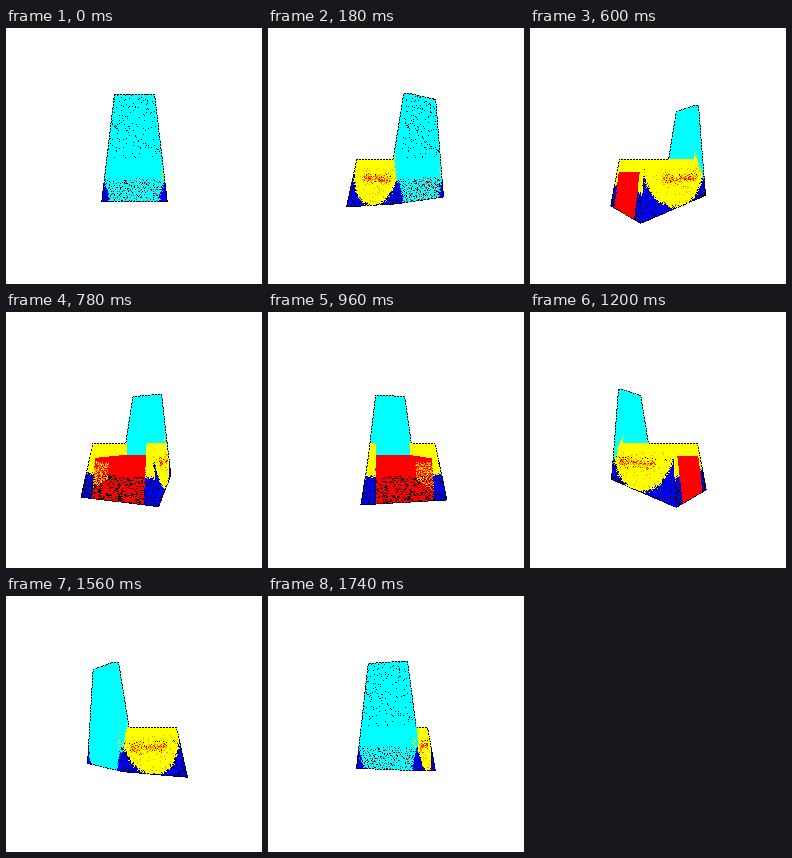
A matplotlib script for the animation above (1800 ms loop, 256 by 256 pixels).

```python
import numpy as np
import matplotlib.pyplot as plt
from matplotlib.animation import FuncAnimation

SIZE, FRAMES, INTERVAL = 256, 30, 60
CX, CY, DIST = 128.5, 131, 221.7
STEP = 0.55

CYAN, YELLOW, RED = (0, 255, 255), (255, 255, 0), (255, 0, 0)
BLUE, ORANGE, BLACK = (0, 0, 255), (255, 150, 0), (0, 0, 0)

rng = np.random.default_rng(4)


def patch(a, b, c, d):
    """Evenly spaced points on the bilinear quad a-b-c-d."""
    a, b, c, d = (np.array(p, float) for p in (a, b, c, d))
    nu = int(max(np.linalg.norm(b - a), np.linalg.norm(c - d)) / STEP) + 2
    nv = int(max(np.linalg.norm(d - a), np.linalg.norm(c - b)) / STEP) + 2
    u, v = np.meshgrid(np.linspace(0, 1, nu), np.linspace(0, 1, nv))
    u, v = u.reshape(-1, 1), v.reshape(-1, 1)
    return (1 - v) * ((1 - u) * a + u * b) + v * ((1 - u) * d + u * c)


def flip(p):
    return (-p[0], p[1], p[2])


def strip(top, bottom):
    """Quad that is symmetric about the middle plane."""
    return patch(flip(top), top, bottom, flip(bottom))


def fill(pts, base):
    return np.tile(np.array(base, np.uint8), (len(pts), 1))


def paint_rear(p):
    col = fill(p, CYAN)
    x, y, _ = (p + rng.normal(0, 0.7, p.shape)).T
    col[(y < -16) & (np.abs(x) > 25 + (16 + y) * 0.23)] = BLUE
    rim = (x > 22) & (y < -3) & (y > -18)
    col[rim & (rng.random(len(p)) < 0.3)] = YELLOW
    return col


def paint_side(p):
    col = fill(p, YELLOW)
    _, y, z = (p + rng.normal(0, 0.9, p.shape)).T
    col[((z - 2) / 35) ** 2 + ((y + 5) / 38) ** 2 > 1] = BLUE
    col[(z > 27 + (8 - y) * 0.33) & (y > -20)] = CYAN
    return col


def paint_arm_front(p):
    col = fill(p, YELLOW)
    col[p[:, 1] + rng.normal(0, 1, len(p)) < -28] = BLUE
    return col


# Corners of the right half of the armchair
rear_top, rear_low = (16.6, 54, 37.5), (27.2, -35.5, 37.3)
back_top, back_low = (16.6, 54, 33), (24.2, -14, 25)
rear_mid, back_mid = (23, 0, 37.4), (23, 0, 27)
arm_out, foot_out = (28.5, 0, -30.5), (37, -49.6, -37)
arm_in, foot_in = (25, 0, -30.5), (25, -49.6, -37)
seat_front, seat_back = (25, -14, -32.3), (21, -14, 27)
arm_back = (21, 0, 27)

rear = strip(rear_top, rear_low)
front = strip(seat_front, foot_in)
side = np.vstack([patch(arm_out, rear_mid, rear_low, foot_out),
                  patch(back_top, rear_top, rear_mid, back_mid)])
arm_front = patch(arm_in, arm_out, foot_out, foot_in)
inner = np.vstack([patch(arm_in, arm_back, seat_back, seat_front),
                   patch(arm_in, arm_out, back_mid, arm_back)])
MIRROR = np.array([-1, 1, 1])

parts = [(rear, paint_rear(rear)), (front, fill(front, RED))]
for pts in (strip(back_top, back_low), strip(back_top, rear_top)):
    parts.append((pts, fill(pts, CYAN)))
seat = strip(seat_front, seat_back)
parts.append((seat, fill(seat, RED)))
for m in (1, MIRROR):
    parts += [(side * m, paint_side(side)),
              (arm_front * m, paint_arm_front(arm_front)),
              (inner * m, fill(inner, YELLOW))]

# Loose specks: positions, colours and the view in which they show
ALWAYS, REAR, FRONT, GLOW = 0, 1, 2, 3
specks = []


def scatter(pts, rate, color, view):
    pick = pts[rng.random(len(pts)) < rate]
    specks.append((pick, fill(pick, color), np.full(len(pick), view)))


ry = rear[:, 1]
scatter(rear[ry > 0], 0.018, BLACK, REAR)
scatter(rear[ry < -17], 0.03, BLACK, REAR)
core = rear[(ry < -16) & (np.abs(rear[:, 0]) < 21)]
scatter(core, 0.05, RED, REAR)

low = front[front[:, 1] < -28]
dots = low[rng.random(len(low)) < 0.075]
for shift in (0, 0.8):
    scatter(dots + [shift, 0, 0], 1, BLACK, FRONT)
fx, fy = np.abs(front[:, 0]), front[:, 1]
glow = front[(fx > 10) & (fy < -17) & (fy > -31 - (fx - 10) * 0.7)]
scatter(glow, 0.2, ORANGE, GLOW)
scatter(glow, 0.06, YELLOW, GLOW)

for m in (1, MIRROR):
    s = side * m
    z, y = s[:, 2], s[:, 1]
    disc = ((z - 2) / 33) ** 2 + ((y + 5) / 36) ** 2 < 1
    band = np.exp(-((y + 18) / 3) ** 2) * disc * (z > -14) * (z < 28)
    scatter(s, 0.13 * band, ORANGE, ALWAYS)
    scatter(s, 0.08 * band, RED, ALWAYS)
    scatter(s, 0.01 * disc * (y < -8), ORANGE, ALWAYS)
    scatter(s, 0.02 * (np.abs(y + 14) < 1) * disc, BLACK, ALWAYS)
    scatter(s, 0.05 * ~disc * (y < -16), BLACK, ALWAYS)
    a = arm_front * m
    scatter(a, 0.08 * (a[:, 1] < -28), BLACK, ALWAYS)

body = np.vstack([p for p, _ in parts])
body_col = np.vstack([c for _, c in parts])
dust = np.vstack([s[0] for s in specks])
dust_col = np.vstack([s[1] for s in specks])
dust_view = np.concatenate([s[2] for s in specks])

rows, cols = np.indices((SIZE, SIZE))
DASH = (rows + cols) % 3 < 2


def project(pts, yaw):
    c, s = np.cos(yaw), np.sin(yaw)
    x, y, z = pts.T
    depth = z * c - x * s
    k = DIST / (DIST - depth)
    px = np.floor(CX + (x * c + z * s) * k).astype(int)
    py = np.floor(CY - y * k).astype(int)
    return px, py, depth


def visible_dust(yaw):
    c, turn = np.cos(yaw), np.degrees(yaw) - 180
    glowing = (dust[:, 0] * turn < 0) & (6 < abs(turn) < 36)
    return ((dust_view == ALWAYS)
            | ((dust_view == REAR) & (c > 0.8))
            | ((dust_view == FRONT) & (c < -0.8))
            | ((dust_view == GLOW) & glowing))


def render(i):
    yaw = 2 * np.pi * i / FRAMES
    show = visible_dust(yaw)
    bx, by, bz = project(body, yaw)
    dx, dy, dz = project(dust[show], yaw)
    px, py = np.concatenate([bx, dx]), np.concatenate([by, dy])
    depth = np.concatenate([bz, dz + 1])
    col = np.vstack([body_col, dust_col[show]])
    order = np.argsort(depth, kind="stable")

    img = np.full((SIZE, SIZE, 3), 255, np.uint8)
    img[py[order], px[order]] = col[order]
    solid = np.zeros((SIZE, SIZE), bool)
    solid[by, bx] = True
    inside = solid.copy()
    for axis in (0, 1):
        for d in (-1, 1):
            inside &= np.roll(solid, d, axis)
    img[solid & ~inside & DASH] = BLACK
    return img


fig = plt.figure(figsize=(SIZE / 100, SIZE / 100), dpi=100, facecolor="white")
ax = fig.add_axes([0, 0, 1, 1])
ax.axis("off")
view = ax.imshow(render(0), interpolation="nearest", aspect="auto")


def update(i):
    view.set_data(render(i))
    return (view,)


anim = FuncAnimation(fig, update, frames=FRAMES, interval=INTERVAL,
                     repeat=True, repeat_delay=0)
plt.show()
```
